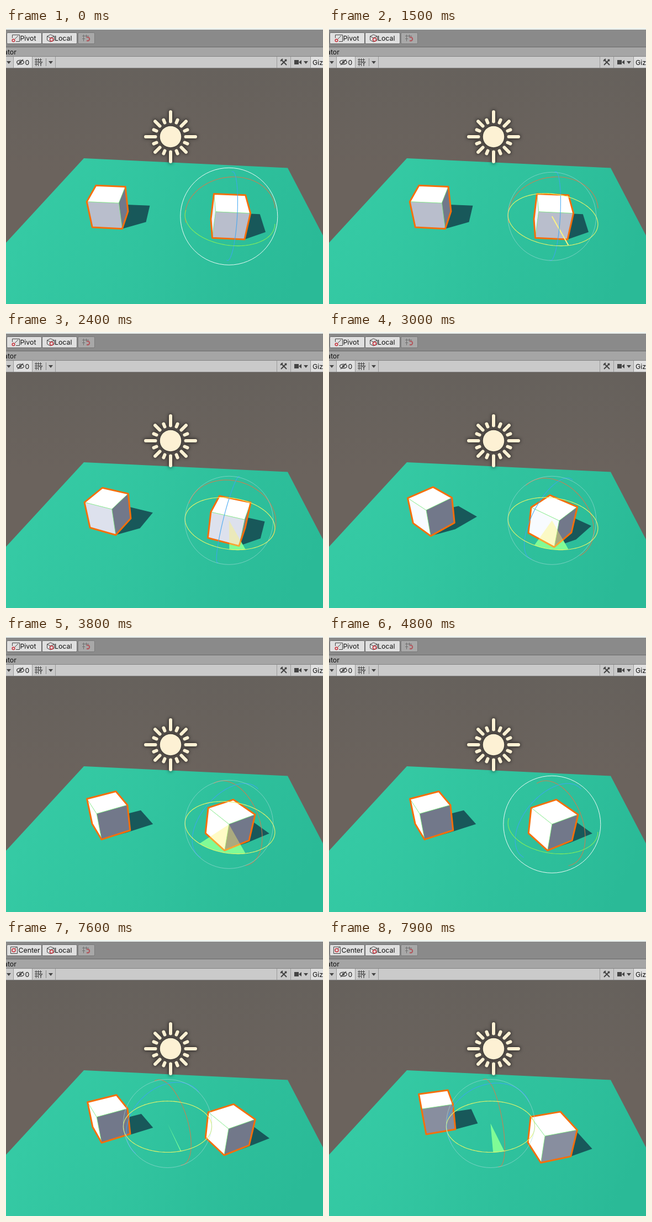
These frames come from a looping animation (574x500 px, 8 s). An HTML page with a canvas:

```html
<!DOCTYPE html>
<html lang="en">
<head>
<meta charset="utf-8">
<title>Pivot and center rotation</title>
<style>
html, body { margin: 0; width: 100%; height: 100%; overflow: hidden; background: #68625d; }
canvas { display: block; }
</style>
</head>
<body>
<canvas id="stage" width="574" height="500"></canvas>
<script>
const ctx = document.getElementById('stage').getContext('2d');
const LOOP = 8000, STEP = 100, RAD = Math.PI / 180;

// Camera looks down at PITCH; the scene's own axes are turned by YAW.
const CX = 293, CY = 362, FOCAL = 500, PITCH = 38.3 * RAD, YAW = 4.5;
const SIN = Math.sin(PITCH), COS = Math.cos(PITCH);
const HEIGHT = -5.13;
const LEFT = [-1.954, HEIGHT, 7.618], RIGHT = [1.936, HEIGHT, 7.08], MIDDLE = [-0.009, HEIGHT, 7.349];
const RING_SIZE = 0.159;

// Rotation in degrees over time: each cube on its own pivot, then both around their center.
const SPIN = [[1500, 0], [1600, 2], [1700, 2], [1800, 5], [2400, 18.5], [2500, 18.5], [2600, 22], [2700, 22],
  [2800, 30], [3000, 39.5], [3600, 53.5], [3800, 56], [4200, 57.5], [4400, 57.5], [4600, 56]];
const ORBIT = [[7500, 0], [7600, 1], [7900, 13]];

const add = (p, q, k = 1) => p.map((v, i) => v + q[i] * k);
const dot = (p, q) => p.reduce((sum, v, i) => sum + v * q[i], 0);
const depth = p => p[2] * COS - p[1] * SIN;
const project = p => {
  const z = depth(p);
  return [CX + FOCAL * p[0] / z, CY - FOCAL * (p[1] * COS + p[2] * SIN) / z];
};

// Local x (right), y (up), z (away) to camera-level space.
function turn([x, y, z], degrees) {
  const c = Math.cos(degrees * RAD), s = Math.sin(degrees * RAD);
  return [x * c + z * s, y, z * c - x * s];
}

function valueAt(keys, t) {
  const next = keys.findIndex(key => key[0] > t);
  if (next === 0) return keys[0][1];
  if (next < 0) return keys[keys.length - 1][1];
  const [t0, v0] = keys[next - 1], [t1, v1] = keys[next];
  return v0 + (v1 - v0) * (t - t0) / (t1 - t0);
}

function path(points, closed = true) {
  ctx.beginPath();
  points.forEach(p => ctx.lineTo(p[0], p[1]));
  if (closed) ctx.closePath();
}
function fill(points, color) {
  path(points);
  ctx.fillStyle = color;
  ctx.fill();
}
function line(points, color, width = 1, closed = false) {
  path(points, closed);
  ctx.strokeStyle = color;
  ctx.lineWidth = width;
  ctx.stroke();
}
function rect(x, y, w, h, color) {
  ctx.fillStyle = color;
  ctx.fillRect(x, y, w, h);
}
function circle(x, y, r, color, width = 1) {
  ctx.beginPath();
  ctx.arc(x, y, r, 0, 2 * Math.PI);
  ctx.strokeStyle = color;
  ctx.lineWidth = width;
  ctx.stroke();
}
function label(text, x, y) {
  ctx.font = '12.3px Inter, sans-serif';
  ctx.fillStyle = '#111';
  ctx.fillText(text, x, y);
}

function hull(points) {
  const sorted = [...points].sort((p, q) => p[0] - q[0] || p[1] - q[1]);
  const chain = list => {
    const out = [];
    for (const p of list) {
      while (out.length > 1) {
        const [a, b] = out.slice(-2);
        if ((b[0] - a[0]) * (p[1] - a[1]) - (b[1] - a[1]) * (p[0] - a[0]) > 0) break;
        out.pop();
      }
      out.push(p);
    }
    return out.slice(0, -1);
  };
  return [...chain(sorted), ...chain(sorted.reverse())];
}

function drawBackdrop() {
  const sky = ctx.createLinearGradient(0, 73, 0, 260);
  sky.addColorStop(0, '#66615c');
  sky.addColorStop(1, '#6b635d');
  rect(0, 73, 574, 427, sky);
  const floor = ctx.createLinearGradient(100, 240, 520, 480);
  floor.addColorStop(0, '#35caa4');
  floor.addColorStop(1, '#2aba97');
  fill([[141, 236], [510, 253.5], [574, 376], [574, 500], [0, 500], [0, 389]], floor);
}

function drawSun() {
  ctx.save();
  ctx.translate(298, 197);
  ctx.shadowColor = 'rgba(0,0,0,.85)';
  ctx.shadowBlur = 6;
  ctx.fillStyle = '#fdf1d4';
  ctx.beginPath();
  ctx.arc(0, 0, 19.3, 0, 2 * Math.PI);
  ctx.fill();
  ctx.lineCap = 'round';
  for (let i = 0; i < 16; i++) {
    const end = i % 4 === 0 ? 45 : i % 2 === 0 ? 39.5 : 33;
    line([[27.5, 0], [end, 0]], '#fdf1d4', 6);
    ctx.rotate(Math.PI / 8);
  }
  ctx.restore();
}

const SIGNS = [-0.5, 0.5];
const CORNERS = SIGNS.flatMap(x => SIGNS.flatMap(y => SIGNS.map(z => [x, y, z])));
const NORMALS = [[0, 1, 0], [1, 0, 0], [-1, 0, 0], [0, 0, 1], [0, 0, -1]];
const TO_LIGHT = turn([-0.557, 0.766, -0.321], YAW);
const SHADOW_SHIFT = turn([0.727, -1, 0.42], YAW);

function drawShadow(center, yaw) {
  const base = CORNERS.map(corner => {
    const p = add(center, turn(corner, yaw));
    return project(corner[1] > 0 ? add(p, SHADOW_SHIFT) : p);
  });
  fill(hull(base), '#18585a');
}

function drawCube(center, yaw) {
  const place = p => project(add(center, turn(p, yaw)));
  for (const normal of NORMALS) {
    const facing = turn(normal, yaw);
    if (dot(facing, add(center, facing, 0.5)) >= 0) continue;
    const light = Math.max(0, dot(facing, TO_LIGHT));
    const face = hull(CORNERS.filter(c => dot(c, normal) > 0).map(place));
    const shade = [114, 120, 138].map((v, i) => Math.min(255, v + light * [222, 218, 206][i]));
    fill(face, `rgb(${shade})`);
    line(face, 'rgba(125,235,125,.65)', 1, true);
  }
  line(hull(CORNERS.map(place)), '#f56f0b', 3, true);
}

// A ring spanned by two axes; frontOnly keeps the half that faces the camera.
function drawRing(center, u, v, color, frontOnly) {
  const radius = depth(center) * RING_SIZE;
  ctx.beginPath();
  let drawing = false;
  for (let i = 0; i <= 180; i++) {
    const a = i * 2 * RAD;
    const offset = add(u.map(k => k * Math.cos(a)), v, Math.sin(a));
    const [x, y] = project(add(center, offset, radius));
    const visible = !frontOnly || dot(offset, center) < 0;
    if (visible) drawing ? ctx.lineTo(x, y) : ctx.moveTo(x, y);
    drawing = visible;
  }
  ctx.strokeStyle = color;
  ctx.lineWidth = 1.1;
  ctx.stroke();
}

function drawGizmo(center, yaw, dragging, hover) {
  const right = turn([1, 0, 0], yaw), away = turn([0, 0, 1], yaw), up = [0, 1, 0];
  const tint = (axis, color) => hover === axis ? '#d5ec8c' : color;
  const [x, y] = project(center);
  drawRing(center, right, up, tint('x', 'rgba(222,118,72,.85)'), true);
  drawRing(center, away, up, tint('z', 'rgba(62,166,242,.9)'), true);
  drawRing(center, right, away, dragging ? '#e9f568' : tint('y', '#85ee59'), !dragging);
  if (dragging) circle(x, y, 80, 'rgba(165,220,215,.6)');
  else circle(x, y, 88, 'rgba(255,255,255,.9)');
}

function pieShape(center, start, sweep) {
  const radius = depth(center) * RING_SIZE, points = [project(center)];
  for (let i = 0; i <= 12; i++) {
    points.push(project(add(center, turn([0, 0, -1], sweep * i / 12 - start), radius)));
  }
  return points;
}

function button(x, y, w, h, color, border = '#6c6c6c') {
  ctx.beginPath();
  ctx.roundRect(x + 0.5, y + 0.5, w - 1, h - 1, 2);
  ctx.fillStyle = color;
  ctx.fill();
  ctx.strokeStyle = border;
  ctx.lineWidth = 1;
  ctx.stroke();
}
function arrow(x, y) {
  fill([[x - 4, y - 2], [x + 4, y - 2], [x, y + 3]], '#444');
}

function drawToolbar(centered) {
  const ink = '#444', red = '#c8323c';
  rect(0, 0, 574, 73, '#8a8a8a');
  rect(0, 0, 574, 3, '#edf2ee');
  button(1, 8, 64, 21, '#dfdfdf');
  button(65, 8, 64, 21, '#dfdfdf');
  button(130, 8, 31, 21, '#a8a8a8', '#7a7a7a');
  if (centered) {
    line([[8.5, 12.5], [20.5, 12.5], [20.5, 24.5], [8.5, 24.5]], ink, 1, true);
    line([[16, 16], [19, 13]], ink);
    circle(14, 18.5, 3, red, 1.5);
    label('Center', 22.5, 23);
  } else {
    line([[11.5, 18], [11.5, 12.5], [24.5, 12.5], [24.5, 24.5], [18, 24.5]], ink);
    line([[16, 20], [22, 14]], ink);
    circle(13.5, 22.5, 2.3, red, 1.5);
    label('Pivot', 25.5, 23);
  }
  line([[74.5, 15], [80.5, 12], [87.5, 15], [87.5, 22], [80.5, 25], [74.5, 22]], ink, 1, true);
  line([[74.5, 15], [80.5, 18], [87.5, 15]], ink);
  circle(82.5, 21, 3, red, 1.5);
  label('Local', 88, 23);

  for (const k of [0, 5]) {
    line([[138, 14.5 + k], [k ? 143 : 150, 14.5 + k]], '#707070');
    line([[140.5 + k, 12], [140.5 + k, k ? 17 : 24]], '#707070');
  }
  ctx.beginPath();
  ctx.arc(148, 20, 3.2, -Math.PI * 0.7, Math.PI * 0.7);
  ctx.strokeStyle = '#b0565c';
  ctx.lineWidth = 2;
  ctx.stroke();

  rect(0, 34, 574, 1, '#6a6a6a');
  rect(0, 35, 574, 16, '#a5a5a5');
  label('ator', -4, 48);
  rect(0, 51, 574, 22, '#cacaca');
  rect(14, 52, 33, 20, '#e0e0e0');
  rect(552, 52, 22, 20, '#e0e0e0');
  rect(0, 51, 574, 1, '#858585');
  rect(0, 72, 574, 1, '#858585');
  for (const x of [13, 47, 89, 490, 515, 551]) rect(x, 52, 1, 20, '#999');
  rect(72, 55, 1, 14, '#888');
  for (const x of [5, 81, 543]) arrow(x, 62);

  ctx.beginPath();
  ctx.ellipse(26, 62, 6.5, 3.7, 0, 0, 2 * Math.PI);
  ctx.strokeStyle = ink;
  ctx.lineWidth = 1.3;
  ctx.stroke();
  circle(26, 62, 1.5, ink, 1.5);
  line([[31, 57], [21, 67]], ink, 1.4);
  label('0', 34.5, 66.5);

  for (const k of [0, 4, 8]) {
    line([[52, 57.5 + k], [k === 8 ? 59 : 65, 57.5 + k]], ink);
    line([[54.5 + k, 55], [54.5 + k, k === 8 ? 61 : 69]], ink);
  }
  line([[60, 61], [63, 65], [66, 61]], ink, 1.2);
  line([[63, 65], [63, 69]], ink, 1.2);

  line([[498, 57], [508, 67]], ink, 2);
  line([[508, 57], [498, 67]], ink, 2);
  line([[497, 60], [501, 56]], ink, 2);
  line([[505, 57], [508, 60]], ink, 2);
  rect(522, 58, 8, 8, ink);
  fill([[530, 62], [535, 58], [535, 66]], ink);
  label('Giz', 555, 66.5);
}

function hoverAt(t) {
  if (t === 600) return 'z';
  if (t === 700) return 'x';
  return t >= 800 && t < 1500 || t >= 6200 && t < 7600 ? 'y' : '';
}

function draw(t) {
  const spin = valueAt(SPIN, t), orbit = valueAt(ORBIT, t);
  const yaw = YAW + spin + orbit;
  const centered = t >= 5600;
  const dragging = t >= 1500 && t < 4800 || t >= 7600;
  const handle = centered ? MIDDLE : RIGHT;
  const cubes = [LEFT, RIGHT].map(p => add(MIDDLE, turn(add(p, MIDDLE, -1), orbit)));
  const pie = dragging && pieShape(handle, centered ? 16 : 9, centered ? orbit : spin);

  ctx.lineJoin = 'round';
  drawBackdrop();
  drawSun();
  cubes.forEach(p => drawShadow(p, yaw));
  if (pie) fill(pie, '#2bffb1');
  cubes.forEach(p => drawCube(p, yaw));
  if (pie) {
    fill(pie, 'rgba(255,245,110,.4)');
    if (spin < 3) line(pie.slice(0, 2), '#fbf283', 2);
  }
  drawGizmo(handle, yaw, dragging, hoverAt(t));
  drawToolbar(centered);
}

const began = performance.now();
function tick() {
  const t = (performance.now() - began) % LOOP;
  draw(Math.floor(t / STEP) * STEP);
  requestAnimationFrame(tick);
}
tick();
</script>
</body>
</html>
```
